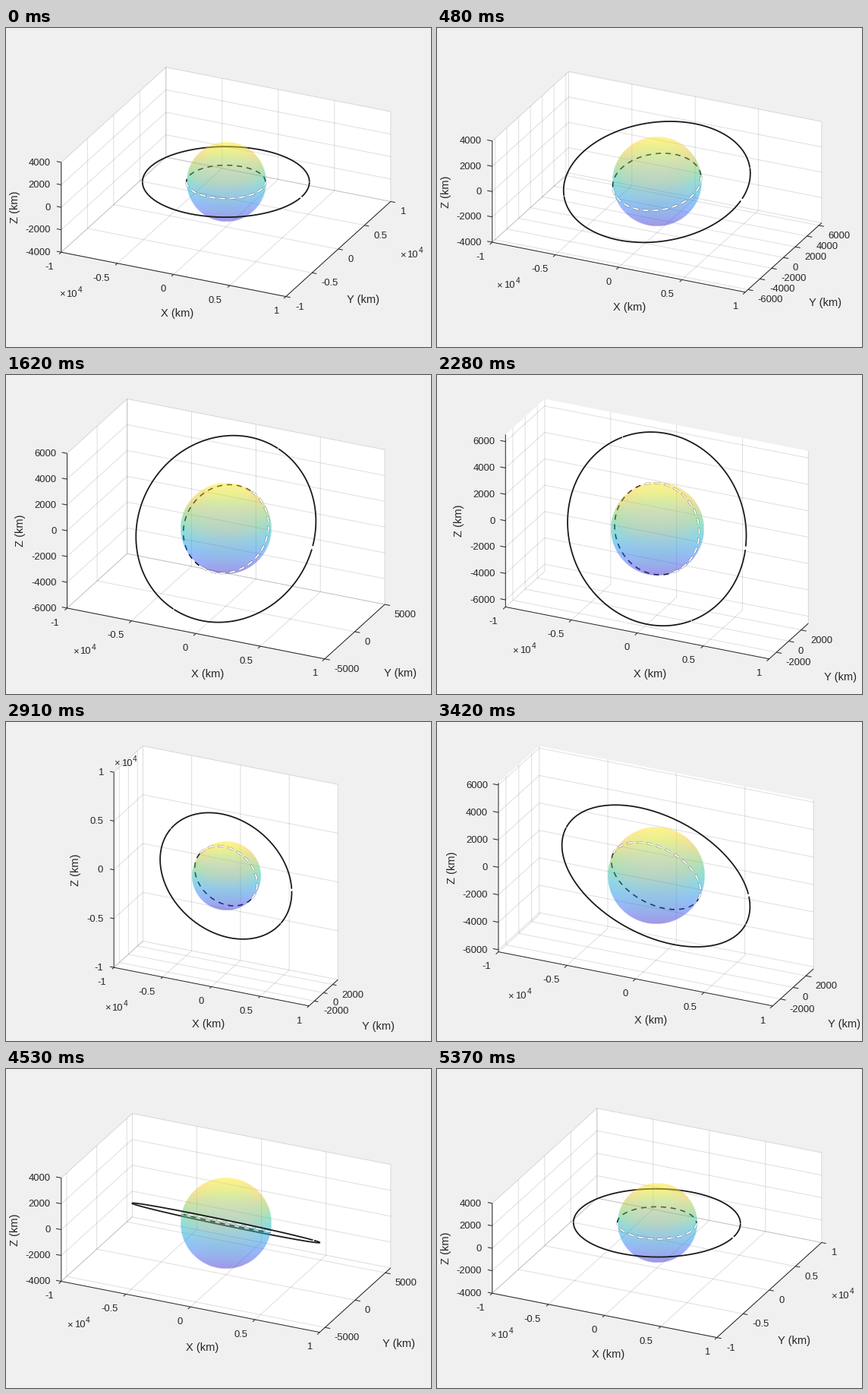
Animation of 560x420 px, one loop 5400 ms. Source, as a matplotlib script:

```python
import numpy as np
import matplotlib
import matplotlib.pyplot as plt
from matplotlib.animation import FuncAnimation
from matplotlib.collections import LineCollection
from matplotlib.colors import LinearSegmentedColormap

matplotlib.rcParams["font.family"] = "Liberation Sans"

W, H, DPI = 560, 420, 100
PX = 72 / DPI                      # points per pixel
FRAMES = 180
PLANET, ORBIT, XLIM = 3189, 6736, 10000
INK = (0.15, 0.15, 0.15)
SIN, COS = np.sin(np.radians(25)), np.cos(np.radians(25))   # azimuth = elevation = 25

PARULA = LinearSegmentedColormap.from_list("parula", [
    (0.242, 0.150, 0.660), (0.281, 0.323, 0.958), (0.179, 0.529, 0.968),
    (0.069, 0.695, 0.839), (0.216, 0.784, 0.592), (0.672, 0.779, 0.223),
    (0.997, 0.766, 0.220), (0.977, 0.984, 0.081)])

fig = plt.figure(figsize=(W / DPI, H / DPI), dpi=DPI, facecolor="#f0f0f0")
ax = fig.add_axes([0, 0, 1, 1])
ax.axis("off")


def planet_image(n=360, alpha=0.3):
    """See-through ball: far shell blended under the near shell."""
    u, v = np.meshgrid(np.linspace(-1, 1, n), np.linspace(1, -1, n))
    rr = u**2 + v**2
    d = np.sqrt(np.clip(1 - rr, 0, 1))
    near = PARULA((v * COS + d * SIN + 1) / 2)[..., :3]
    far = PARULA((v * COS - d * SIN + 1) / 2)[..., :3]
    total = 1 - (1 - alpha)**2
    img = np.empty((n, n, 4))
    img[..., :3] = (alpha * near + alpha * (1 - alpha) * far) / total
    img[..., 3] = total * (rr <= 1)
    return img


ball = ax.imshow(planet_image(), aspect="auto", interpolation="bilinear", zorder=4)
ax.set_xlim(0, W)
ax.set_ylim(H, 0)


def y_limit(v):
    if v > 6667:
        return 10000
    return 5000 if 3333 < v <= 5000 else v


def z_limit(v):
    for nice in (4000, 5000, 6000):
        if v <= nice:
            return nice
    return v if v <= 6667 else 10000


def ticks(lim):
    step = 5000 if lim in (5000, 10000) or 5000 < lim < 6000 else 2000
    n = int(lim // step)
    return np.arange(-n, n + 1) * step


def tick_text(v, lim):
    return "%g" % (v / 10000 if lim == 10000 else v)


class View:
    def __init__(self, yl, zl):
        a, b, c = 1, yl / XLIM, zl / XLIM
        self.s = min(434 / (COS * a + SIN * b),
                     342.3 / (SIN * SIN * a + SIN * COS * b + COS * c))
        self.k = self.s / (2 * XLIM)
        self.cx = 289.8 - max(0, self.s - 388) * 0.12
        self.cy = 202.65

    def __call__(self, x, y, z):
        return (self.cx + self.k * (COS * x + SIN * y),
                self.cy - self.k * (-SIN * SIN * x + SIN * COS * y + COS * z))


live = []


def text(x, y, s, size=13, **kw):
    live.append(ax.text(x, y, s, fontsize=size * PX, color=INK, zorder=3, **kw))


def lines(segs, color, width, z):
    live.append(ax.add_collection(LineCollection(
        segs, colors=[color], linewidths=width * PX, zorder=z)))


def path(x, y, color, width, z, **kw):
    live.extend(ax.plot(x, y, color=color, lw=width * PX, zorder=z, **kw))


def exponent(x, y):
    text(x - 16, y + 4.7, "×", ha="left")
    text(x - 6.5, y + 4.7, "10", ha="left")
    text(x + 9, y - 1, "4", 10, ha="left")


def draw_axes(p, yl, zl):
    xl = XLIM
    xt, yt, zt = ticks(xl), ticks(yl), ticks(zl)
    walls = [[(-xl, -yl, -zl), (xl, -yl, -zl), (xl, yl, -zl), (-xl, yl, -zl)],
             [(-xl, yl, -zl), (xl, yl, -zl), (xl, yl, zl), (-xl, yl, zl)],
             [(-xl, -yl, -zl), (-xl, yl, -zl), (-xl, yl, zl), (-xl, -yl, zl)]]
    for wall in walls:
        live.extend(ax.fill(*zip(*(p(*c) for c in wall)), color="white", lw=0, zorder=0))

    grid = []
    for x in xt:
        grid += [[p(x, -yl, -zl), p(x, yl, -zl), p(x, yl, zl)]]
    for y in yt:
        grid += [[p(xl, y, -zl), p(-xl, y, -zl), p(-xl, y, zl)]]
    for z in zt:
        grid += [[p(-xl, -yl, z), p(-xl, yl, z), p(xl, yl, z)]]
    lines(grid, (0.15, 0.15, 0.15, 0.15), 1, 1)

    t = 0.02 * 2 * xl
    rulers = [[p(-xl, -yl, zl), p(-xl, -yl, -zl), p(xl, -yl, -zl), p(xl, yl, -zl)]]
    rulers += [[p(x, -yl, -zl), p(x, -yl - t, -zl)] for x in xt]
    rulers += [[p(xl, y, -zl), p(xl + t, y, -zl)] for y in yt]
    rulers += [[p(-xl, -yl, z), p(-xl - t, -yl, z)] for z in zt]
    lines(rulers, INK, 1, 2)

    for v in xt:
        x, y = p(v, -yl, -zl)
        text(x - 10, y + 22.7, tick_text(v, xl), ha="right")
    for v in yt:
        x, y = p(xl, v, -zl)
        text(x + 12.5, y + 17, tick_text(v, yl), ha="left")
    for v in zt:
        x, y = p(-xl, -yl, v)
        text(x - 14, y + 3.7, tick_text(v, zl), ha="right")

    # axis titles: offset across and along each ruler
    along = 14.6 + 0.217 * (p.s - 326)
    ox, oy = 0.981 * along - 0.195 * 48.7, 0.195 * along + 0.981 * 48.7
    x, y = p(0, -yl, -zl)
    text(x + ox, y + oy + 5, "X (km)", 14.67, ha="center")
    x, y = p(-xl, -yl, -zl)
    exponent(x + ox + 8, y + oy + 3)

    size = p.s * yl / xl * 0.571
    along = np.interp(size, [50, 71, 107, 125, 186], [25, 18.7, 8.5, 5.3, -20.2])
    across = 71.4 if yl == 10000 else 80.4
    x, y = p(xl, 0, -zl)
    text(x + 0.741 * along + 0.672 * across,
         y - 0.672 * along + 0.741 * across + 5, "Y (km)", 14.67, ha="center")
    if yl == 10000:
        x, y = p(xl, yl, -zl)
        exponent(x + 28, y + 69)

    x, y = p(-xl, -yl, 0)
    text(x - (50 if zl == 10000 else 61), y, "Z (km)", 14.67,
         ha="center", va="center", rotation=90)
    if zl == 10000:
        x, y = p(-xl, -yl, zl)
        exponent(x + 16, y - 13)


def ring(p, radius, inc, end):
    """Screen points of a tilted circle, and which of them face the viewer."""
    a = np.radians(np.linspace(0, end, 721))
    x, y, z = np.cos(a), np.sin(a) * np.cos(inc), np.sin(a) * np.sin(inc)
    near = SIN * COS * x - COS * COS * y + SIN * z >= 0
    return (*p(radius * x, radius * y, radius * z), near)


def runs(x, y, mask):
    """The masked arc as one continuous line, rotated so it does not wrap."""
    start = np.flatnonzero(mask & ~np.roll(mask, 1))
    k = start[0] if len(start) else 0
    m = np.roll(mask, -k)
    return np.roll(x, -k)[m], np.roll(y, -k)[m]


def draw(i):
    for a in live:
        a.remove()
    live.clear()

    inc = np.radians(i)
    yl = y_limit(max(PLANET, ORBIT * abs(np.cos(inc))))
    zl = z_limit(max(PLANET, ORBIT * np.sin(inc)))
    p = View(yl, zl)
    draw_axes(p, yl, zl)

    r = PLANET * p.k
    ball.set_extent((p.cx - r, p.cx + r, p.cy + r, p.cy - r))
    ax.set_xlim(0, W)
    ax.set_ylim(H, 0)

    x, y, near = ring(p, ORBIT, inc, 358)
    for mask, z in ((~near, 3.5), (near, 6)):
        path(np.where(mask, x, np.nan), y, (0.1, 0.1, 0.1), 1.8, z,
             solid_capstyle="butt")

    x, y, near = ring(p, PLANET, inc, 359.5)
    dash = dict(dash_capstyle="butt")
    path(*runs(x, y, ~near), "black", 1.6, 3.6, ls=(0, (7 / 1.6, 6 / 1.6)), **dash)
    front = runs(x, y, near)
    path(*front, (0.3, 0.3, 0.3, 0.6), 2.8, 5, ls=(0, (8 / 2.8, 5 / 2.8)), **dash)
    path(*front, "white", 1.8, 5.1, ls=(0, (7.5 / 1.8, 5.5 / 1.8)), **dash)
    return live


anim = FuncAnimation(fig, draw, frames=FRAMES, interval=30, repeat=True,
                     repeat_delay=0, init_func=lambda: [], blit=False)
plt.show()
```
